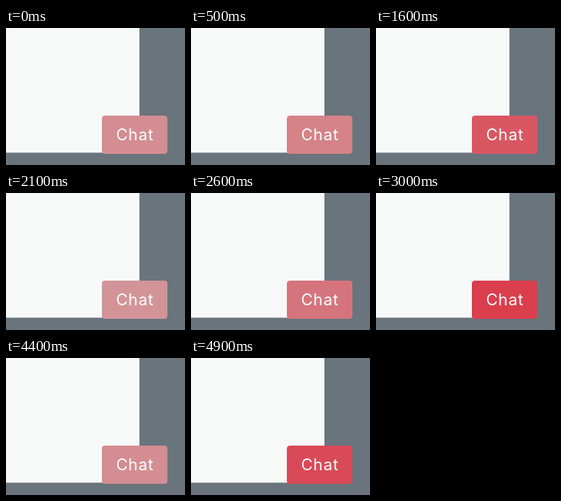
An HTML page that plays this animation: 224x172 px, repeating every 5000 ms.

```html
<!DOCTYPE html>
<html lang="en">
<head>
<meta charset="utf-8">
<title>Pulsing chat button</title>
<style>
  html, body { margin: 0; width: 100%; height: 100%; overflow: hidden; background: #69747d; }
  svg { display: block; width: 224px; height: 172px; }
  text { font: 400 20px Inter, "Open Sans", sans-serif; letter-spacing: 0.8px; fill: #fff; }
</style>
</head>
<body>
<svg viewBox="0 0 224 172">
  <rect width="224" height="172" fill="#69747d"/>
  <rect width="167" height="156.5" fill="#f7f9f9"/>
  <rect id="button" x="120" y="110" width="82" height="48" rx="4"/>
  <text x="161.4" y="141" text-anchor="middle">Chat</text>
</svg>
<script>
  const LOOP = 5000, STEP = 100, PERIOD = 2000, VIVID_AT = 1200;
  const vivid = [220, 53, 69], faded = [211, 150, 154];
  const button = document.getElementById("button");

  function draw(t) {
    const phase = (t - VIVID_AT) / PERIOD * 2 * Math.PI;
    const fade = (1 - Math.cos(phase)) / 2;
    const rgb = vivid.map((v, i) => Math.round(v + (faded[i] - v) * fade));
    button.setAttribute("fill", `rgb(${rgb})`);
  }

  const start = performance.now();
  function tick() {
    const t = (performance.now() - start) % LOOP;
    draw(Math.floor(t / STEP) * STEP);
    requestAnimationFrame(tick);
  }
  tick();
</script>
</body>
</html>
```
